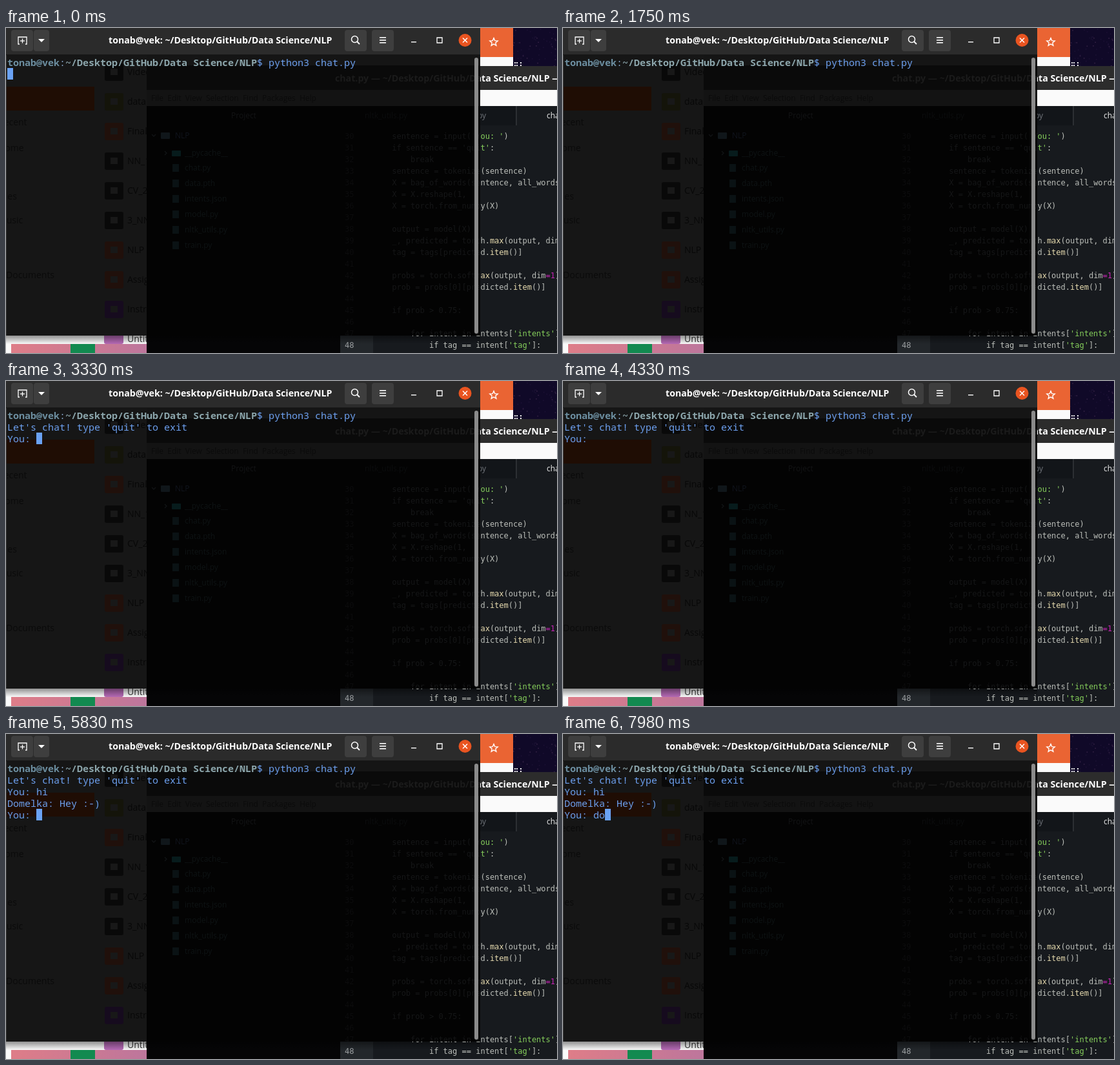
Recreate the animation shown at these times as an HTML page with a canvas. Size 854x504 px, loop 8 s.

```html
<!DOCTYPE html>
<html lang="en">
<head>
<meta charset="utf-8">
<title>Terminal chat</title>
<style>
  html, body { margin: 0; width: 100%; height: 100%; overflow: hidden; background: #000; }
  canvas { display: block; width: 854px; height: 504px; }
</style>
</head>
<body>
<canvas id="stage" width="854" height="504"></canvas>
<script>
const W = 854, H = 504, LOOP = 8000;
const MONO = '15px "Noto Sans Mono", monospace';
const MONO_BOLD = 'bold ' + MONO;
const CODE = '12px "DejaVu Sans Mono", monospace';
const TITLE = 'bold 14.2px "Open Sans", sans-serif';
const UI = '14px "Open Sans", sans-serif';
const SMALL = '12px "Open Sans", sans-serif';

const stage = document.getElementById('stage').getContext('2d');
const backdrop = document.createElement('canvas');
backdrop.width = W;
backdrop.height = H;
let g = backdrop.getContext('2d');

function box(x, y, w, h, fill, r = 0) {
  g.fillStyle = fill;
  g.beginPath();
  g.roundRect(x, y, w, h, r);
  g.fill();
}

// y is the text baseline; returns the x where the text ends
function text(str, x, y, font, fill) {
  g.font = font;
  g.fillStyle = fill;
  g.fillText(str, x, y);
  return x + g.measureText(str).width;
}

function line(points, color, width = 1.3, close = false) {
  g.strokeStyle = color;
  g.lineWidth = width;
  g.beginPath();
  points.forEach(([x, y]) => g.lineTo(x, y));
  if (close) g.closePath();
  g.stroke();
}

function clipped(x, y, w, h, draw) {
  g.save();
  g.beginPath();
  g.rect(x, y, w, h);
  g.clip();
  draw();
  g.restore();
}

function blend(x0, y0, x1, y1, from, to) {
  const fill = g.createLinearGradient(x0, y0, x1, y1);
  fill.addColorStop(0, from);
  fill.addColorStop(1, to);
  return fill;
}

function seeded(seed) {
  return () => (seed = (seed * 16807) % 2147483647) / 2147483647;
}

// Code lines: [row, indent, text]
const codeLines = [
  [0, 4, "sentence = input('You: ')"],
  [1, 4, "if sentence == 'quit':"],
  [2, 8, 'break'],
  [3, 4, 'sentence = tokenize(sentence)'],
  [4, 4, 'X = bag_of_words(sentence, all_words)'],
  [5, 4, 'X = X.reshape(1,'],
  [6, 4, 'X = torch.from_numpy(X)'],
  [8, 4, 'output = model(X)'],
  [9, 4, '_, predicted = torch.max(output, dim=1)'],
  [10, 4, 'tag = tags[predicted.item()]'],
  [12, 4, 'probs = torch.softmax(output, dim=1)'],
  [13, 4, 'prob = probs[0][predicted.item()]'],
  [15, 4, 'if prob > 0.75:'],
  [17, 8, "for intent in intents['intents']:"],
  [18, 12, "if tag == intent['tag']:"]
];

function codeColor(token) {
  if (token[0] === "'") return '#86cf5c';
  if (/^=?\d/.test(token)) return '#c424b4';
  if (/^(max|item|softmax)$/.test(token)) return '#e8dcb0';
  return '#bcbfba';
}

function code(dim) {
  for (const [row, indent, src] of codeLines) {
    let x = 569.3 + indent * 7.22;
    const y = 172 + row * 18;
    for (const token of src.match(/'[^']*'|=\d|\w+|\W/g)) {
      x = text(token, x, y, CODE, dim || codeColor(token));
    }
  }
}

function editorTitle(color) {
  text('chat.py — ~/Desktop/GitHub/Data Science/NLP —', 510, 83, TITLE, color);
}

function star(cx, cy, r) {
  const pts = [];
  for (let i = 0; i < 10; i++) {
    const a = -Math.PI / 2 + i * Math.PI / 5, d = i % 2 ? r * 0.45 : r;
    pts.push([cx + d * Math.cos(a), cy + d * Math.sin(a)]);
  }
  line(pts, '#ffffff', 1.4, true);
}

function rightSide() {
  box(735, 0, 119, 59, '#100928');
  const rnd = seeded(11);
  for (let i = 0; i < 60; i++) {
    box(786 + rnd() * 68, rnd() * 58, 1.5, 1.5, i % 3 ? '#1d1236' : '#392548');
  }
  box(735, 0, 51, 45, '#ea6433');
  box(735, 45, 51, 14, '#fafafa');
  star(756, 22, 6.5);
  for (const x of [788, 791, 797]) {
    box(x, 53, 2, 2, '#f0f0f0');
    box(x, 57, 2, 2, '#f0f0f0');
  }

  box(735, 59, 119, 37, '#2c2c2c');
  box(735, 96, 119, 25, '#fafafa');
  box(735, 121, 119, 383, '#171a1e');
  box(735, 121, 57, 30, '#121519');
  box(790.5, 121, 1, 30, '#474a4e');
  text('py', 731, 140, SMALL, '#70747a');
  text('chat.py', 838, 140, SMALL, '#eeeeee');
  editorTitle('#ffffff');
}

function bottomEdge() {
  box(0, 477, 218, 13, '#fafafa');
  box(0, 490, 8, 14, '#fafafa');
  box(8, 490, 210, 14, blend(8, 0, 218, 0, '#de7d88', '#bd769c'));
  box(100, 490, 38, 14, '#128a50');
  box(152, 470, 30, 20, '#b469b4', 3);
  text('Untitled', 188, 487, UI, '#333333');
  box(218, 477, 300, 27, '#050506');
  box(518, 477, 51, 27, '#23272b');
  box(569, 477, 285, 27, '#171a1e');
  text('48', 525, 496, CODE, '#9da0a3');
  box(0, 477, 735, 13, blend(0, 477, 0, 490, 'rgba(0,0,0,.42)', 'rgba(0,0,0,0)'));
}

function fileManager() {
  box(0, 42, 218, 435, '#161616');
  box(0, 91, 137, 37, '#1f0d04');
  const side = [['Recent', 151], ['Home', 191], ['Files', 266], ['Music', 303]];
  side.forEach(([s, y]) => text(s, -12, y, UI, '#0b0b0b'));
  text('Documents', 0, 388, UI, '#0b0b0b');
  const dark = '#090909', rust = '#20100b';
  const files = [
    ['Video', dark], ['data', '#14140a'], ['Final', rust], ['NN_1', dark], ['CV_2', dark],
    ['3_NN', dark], ['NLP', rust], ['Assign', rust], ['Instr', '#160b1e']
  ];
  files.forEach(([name, fill], i) => {
    const y = 68 + i * 46;
    box(153, y - 13, 29, 27, fill, 3);
    box(162, y - 5, 11, 10, '#181818');
    text(name, 188, y + 5, UI, '#080808');
  });
}

function shadedEditor() {
  box(218, 58, 517, 38, '#0a0a0a');
  box(218, 96, 517, 25, '#131313');
  box(218, 121, 517, 356, '#030303');
  editorTitle('#1b1b1b');
  text('File  Edit  View  Selection  Find  Packages  Help', 225, 113, SMALL, '#0b0b0b');
  text('Project', 349, 140, SMALL, '#131415');
  text('nltk_utils.py', 556, 140, SMALL, '#0c0d0e');

  box(240, 162, 14, 10, '#10161a', 1);
  text('NLP', 262, 171, SMALL, '#10141c');
  line([[226, 165], [229, 168], [232, 165]], '#121416');
  box(257, 190, 14, 9, '#071b1c', 1);
  line([[246, 191], [249, 194], [246, 197]], '#121416');
  const tree = ['__pycache__', 'chat.py', 'data.pth', 'intents.json', 'model.py', 'nltk_utils.py', 'train.py'];
  tree.forEach((name, i) => {
    const y = 194 + i * 24 - (i > 0);
    if (i) box(258, y - 6, 10, 12, '#0a1214');
    text(name, 277, y + 4, SMALL, '#0e1314');
  });
  for (let i = 0; i < 18; i++) text(30 + i, 525, 172 + i * 18, CODE, '#0c0c0d');
  code('#151617');
}

function titleBar() {
  box(0, 0, 735, 42, '#2b2b2b');
  box(0, 41, 735, 1, '#161616');
  const button = '#3e3e3e', ink = '#ffffff';
  box(8, 3, 34, 33, button, 4);
  box(43, 3, 24, 33, button, 4);
  box(525, 3, 34, 33, button, 4);
  box(567, 3, 34, 33, button, 4);

  line([[21, 25], [19, 25], [19, 14], [32, 14], [32, 25], [30, 25]], ink);
  line([[22, 20], [29, 20]], ink);
  line([[25.5, 16.5], [25.5, 23.5]], ink);
  g.fillStyle = ink;
  g.beginPath();
  g.moveTo(50, 17);
  g.lineTo(60, 17);
  g.lineTo(55, 22);
  g.fill();

  g.strokeStyle = ink;
  g.lineWidth = 1.5;
  g.beginPath();
  g.arc(540.5, 17.5, 5, 0, 7);
  g.stroke();
  line([[544, 21], [548, 25]], ink, 1.8);
  for (const y of [14, 18, 22]) box(579, y, 10, 1.6, ink);

  box(628, 21, 8, 1.4, ink);
  line([[668, 15], [676, 15], [676, 23], [668, 23]], ink, 1.3, true);
  g.fillStyle = '#e95420';
  g.beginPath();
  g.arc(711.5, 19, 10, 0, 7);
  g.fill();
  line([[708, 15.5], [715, 22.5]], ink, 1.5);
  line([[715, 15.5], [708, 22.5]], ink, 1.5);
  text('tonab@vek: ~/Desktop/GitHub/Data Science/NLP', 159, 24, TITLE, ink);
}

function drawBackdrop() {
  rightSide();
  bottomEdge();
  clipped(735, 151, 119, 326, () => code());
  clipped(569, 477, 285, 27, () => code());
  box(0, 42, 735, 435, '#151515');
  clipped(0, 42, 735, 435, () => {
    fileManager();
    shadedEditor();
  });
  titleBar();
  box(0, 42, 1, 435, '#333333');
  box(726, 46, 6, 428, '#8b8b8b', 3);

  let x = text('tonab@vek', 2, 59, MONO_BOLD, '#6c8ea0');
  x = text(':', x, 59, MONO, '#8fb0d8');
  x = text('~/Desktop/GitHub/Data Science/NLP', x, 59, MONO_BOLD, '#8ca6ac');
  text('$ python3 chat.py', x, 59, MONO, '#6c9fee');
}

// Typed characters restart the blink, as does new output
const READY = 2050, REPLY = 5400;
const keys = [[4600, 'h'], [4750, 'i'], [7600, 'd'], [7800, 'o']];

function typed(t, from, to) {
  return keys.filter(([at]) => at >= from && at < to && at <= t).map(k => k[1]).join('');
}

function render(t) {
  stage.drawImage(backdrop, 0, 0);
  const lines = [];
  if (t >= READY) lines.push("Let's chat! type 'quit' to exit", 'You: ' + typed(t, READY, REPLY));
  if (t >= REPLY) lines.push('Domelka: Hey :-)', 'You: ' + typed(t, REPLY, LOOP));
  lines.forEach((s, i) => text(s, 2, 77 + i * 18, MONO, '#6c9fee'));

  const resets = [-400, READY, REPLY, ...keys.map(k => k[0])];
  const last = Math.max(...resets.filter(at => at <= t));
  if ((t - last) % 1200 < 600) {
    const row = Math.max(0, lines.length - 1);
    const col = lines.length ? lines[row].length : 0;
    box(2 + col * 9, 62 + row * 18, 9, 18, '#6aa2f4');
  }
}

drawBackdrop();
g = stage;
const start = performance.now();
function tick() {
  render((performance.now() - start) % LOOP);
  requestAnimationFrame(tick);
}
render(0);
requestAnimationFrame(tick);
</script>
</body>
</html>
```
